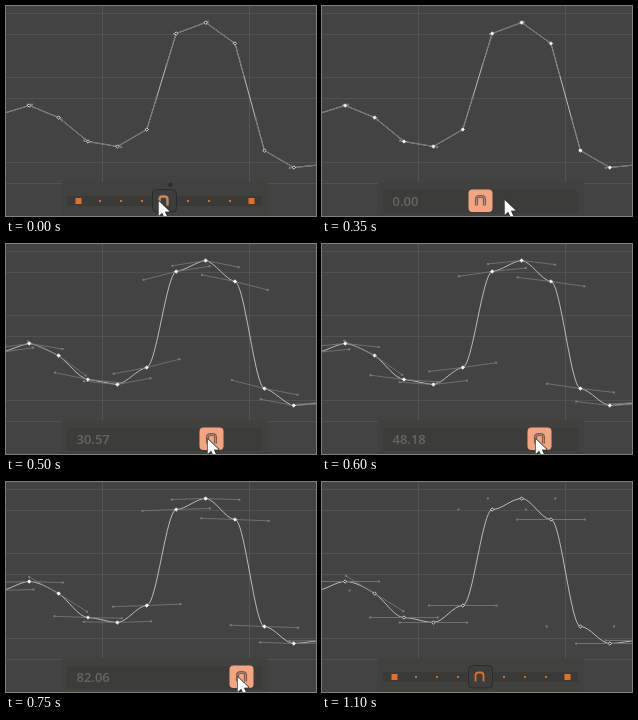
An HTML page with a canvas for the animation above (1300 ms loop, 310x210 px).

```html
<!DOCTYPE html>
<html lang="en">
<head>
<meta charset="utf-8">
<title>Tangent slider</title>
<style>
  html, body { margin: 0; width: 100%; height: 100%; overflow: hidden; background: #434344; }
  canvas { display: block; width: 310px; height: 210px; }
</style>
</head>
<body>
<canvas id="stage" width="310" height="210"></canvas>
<script>
const ctx = document.getElementById('stage').getContext('2d');
const LOOP = 1300, TICK = 50;
const PRESS = 50, DRAG = 400, RELEASE = 850, RESET = 1100;
const STEP = 29.4;       // pixels per key
const ASPECT = 7;        // value units per time unit on screen
const HANDLE = 33.7;
const MID = 159, REACH = 85;

const heights = [108.5, 99.5, 111.5, 135.5, 140.5, 123.5, 27.5, 16.5, 37.5, 144.5, 161.5, 158.5];
const thin = [0, 6, 7, 9];   // flat handles of these keys show only their ends
const keys = heights.map((y, i) => ({ x: 23.2 + STEP * (i - 1), y }));
const angle = slope => Math.atan(slope * ASPECT);

keys.forEach((k, i) => {
  const slope = j => (keys[j + 1].y - keys[j].y) / STEP;
  k.from = [angle(slope(Math.max(i - 1, 0))), angle(slope(Math.min(i, keys.length - 2)))];
  k.to = i === 2 ? angle((keys[3].y - keys[1].y) / (2 * STEP)) : 0;
});

function box(x, y, w, h, r, fill, stroke) {
  ctx.beginPath();
  ctx.roundRect(x, y, w, h, r);
  ctx.fillStyle = fill;
  ctx.fill();
  if (stroke) {
    ctx.strokeStyle = stroke;
    ctx.lineWidth = 1;
    ctx.stroke();
  }
}

function rect(x, y, w, h, fill) {
  ctx.fillStyle = fill;
  ctx.fillRect(x, y, w, h);
}

function line(x1, y1, x2, y2) {
  ctx.beginPath();
  ctx.moveTo(x1, y1);
  ctx.lineTo(x2, y2);
  ctx.stroke();
}

function drawGrid() {
  rect(0, 0, 310, 210, '#434344');
  for (const y of [7, 28, 71, 92, 156, 177]) rect(0, y, 310, 1, '#515152');
  for (const x of [96, 243]) rect(x, 0, 1, 210, '#545455');
}

function drawCurve(blend, active) {
  const slope = (k, side) => Math.tan(k.from[side] + (k.to - k.from[side]) * blend) / ASPECT;

  ctx.beginPath();
  ctx.moveTo(keys[0].x, keys[0].y);
  for (let i = 1; i < keys.length; i++) {
    const a = keys[i - 1], b = keys[i], d = STEP / 3;
    ctx.bezierCurveTo(a.x + d, a.y + d * slope(a, 1), b.x - d, b.y - d * slope(b, 0), b.x, b.y);
  }
  ctx.strokeStyle = '#e2e2e2';
  ctx.lineWidth = 0.75;
  ctx.stroke();

  keys.forEach((k, i) => {
    for (const side of [0, 1]) {
      const s = slope(k, side);
      const dx = (side ? 1 : -1) * HANDLE / Math.hypot(1, s);
      const x = k.x + dx, y = k.y + dx * s;
      ctx.strokeStyle = '#747474';
      ctx.lineWidth = 0.9;
      if (blend < 1 || !thin.includes(i)) line(k.x, k.y, x, y);
      rect(x - 1, y - 1, 2, 2, '#7c7c7c');
    }
  });

  for (const k of keys) {
    const r = 1.7;
    ctx.beginPath();
    ctx.moveTo(k.x, k.y - r);
    ctx.lineTo(k.x + r, k.y);
    ctx.lineTo(k.x, k.y + r);
    ctx.lineTo(k.x - r, k.y);
    ctx.closePath();
    ctx.fillStyle = active ? '#fff' : '#404040';
    ctx.fill();
    ctx.strokeStyle = '#f0f0f0';
    ctx.lineWidth = 0.8;
    ctx.stroke();
  }
}

function drawMagnet(x, color, width) {
  ctx.beginPath();
  ctx.moveTo(x - 4, 199.5);
  ctx.lineTo(x - 4, 193.5);
  ctx.quadraticCurveTo(x - 4, 190.5, x - 1, 190.5);
  ctx.lineTo(x + 1, 190.5);
  ctx.quadraticCurveTo(x + 4, 190.5, x + 4, 193.5);
  ctx.lineTo(x + 4, 199.5);
  ctx.strokeStyle = color;
  ctx.lineWidth = width;
  ctx.stroke();
}

function drawIdle(hover) {
  rect(61, 190, 195, 10, '#3a3a38');
  for (const side of [-1, 1]) {
    rect(MID + side * 86.5 - 3, 192, 6, 6, '#df7029');
    for (const d of [23, 44, 65]) rect(MID + side * d - 1, 194, 2, 2, '#cd6c2d');
  }
  box(146.5, 183.5, 24, 22.5, 4, '#3d3d3c', '#2b2b2b');
  if (hover) {
    ctx.beginPath();
    ctx.arc(164.5, 179, 2.2, 0, 7);
    ctx.fillStyle = '#2c2c2b';
    ctx.fill();
  }
  drawMagnet(157.5, hover ? '#c58a5c' : '#d9702f', hover ? 2.4 : 1.8);
}

function drawSlider(offset, value) {
  box(61, 184, 195, 23, 2, '#3c3c3a');
  ctx.font = '600 13px "Open Sans", sans-serif';
  ctx.fillStyle = '#666664';
  ctx.fillText(value.toFixed(2), 70.5, 200);
  const x = MID - 0.5 + offset;
  box(x - 12, 183.5, 24, 22.5, 4, '#f3a583');
  drawMagnet(x, '#795f54', 3.2);
  drawMagnet(x, '#bd8973', 1);
}

function drawCursor(x, y) {
  const outline = [[0, 0], [0, 15], [3.5, 11.8], [6.2, 17.5], [8.8, 16.3], [6.2, 10.8], [11, 10.6]];
  ctx.beginPath();
  outline.forEach(([dx, dy]) => ctx.lineTo(x + dx, y + dy));
  ctx.closePath();
  ctx.lineJoin = 'round';
  ctx.strokeStyle = '#2a2a2a';
  ctx.lineWidth = 1.4;
  ctx.stroke();
  ctx.fillStyle = '#fff';
  ctx.fill();
  ctx.lineJoin = 'miter';
}

function dragOffset(t) {
  if (t < DRAG) return 0;
  if (t >= RELEASE) return REACH;
  return Math.round(47 + (t - 500) * 0.12);
}

function cursorX(t) {
  if (t < 250) return 152.7;
  if (t < DRAG) return 182.7 - (350 - t) * 0.2;
  return 154.7 + dragOffset(t);
}

function draw(now) {
  const t = Math.floor((now % LOOP) / TICK) * TICK;
  const offset = dragOffset(t);
  const blend = (offset / REACH) ** 2;
  const held = t >= PRESS && t < RELEASE;

  drawGrid();
  drawCurve(blend, held);
  box(56, 176, 206, 40, 2, '#41413e');
  if (t < PRESS || t >= RESET) drawIdle(t < PRESS);
  else drawSlider(offset, blend * 100);
  if (t < RELEASE) drawCursor(cursorX(t), t >= 150 && t < DRAG ? 194 : 195);
}

const start = performance.now();
function frame() {
  draw(performance.now() - start);
  requestAnimationFrame(frame);
}
frame();
</script>
</body>
</html>
```
